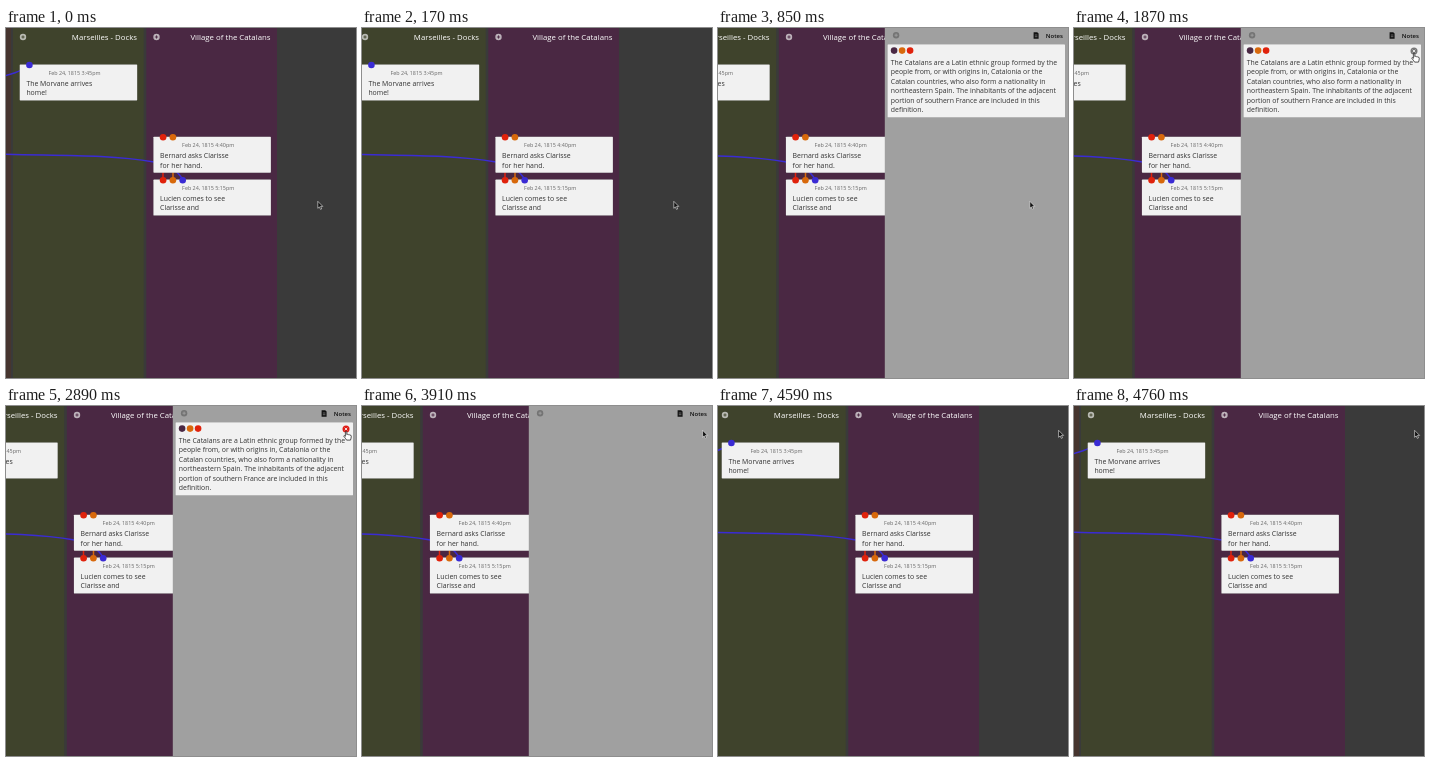
Animation, 350 px wide and 350 px high, one loop 5060 ms. Source, as an HTML page:

```html
<!DOCTYPE html>
<html lang="en">
<head>
<meta charset="utf-8">
<title>Story board</title>
<style>
  html, body { margin: 0; width: 100%; height: 100%; overflow: hidden; background: #3a3a3a; }
  svg { display: block; width: 350px; height: 350px; font-family: "Open Sans", sans-serif; }
  .head { font-size: 7.8px; fill: #fff; text-anchor: end; }
  .body { font-size: 6.9px; fill: #333; }
  .date { font-size: 5.4px; fill: #666; }
  .label { font-size: 6px; font-weight: 600; fill: #111; }
  .card { fill: #f1f1f1; filter: drop-shadow(0 .7px .7px rgba(0, 0, 0, .5)); }
  .thread { fill: none; stroke-width: 1.5; }
</style>
</head>
<body>
<svg viewBox="0 0 350 350">
  <rect width="350" height="350" fill="#3a3a3a"/>
  <g id="board"></g>
  <g id="panel">
    <rect width="190" height="350" fill="#a0a0a0"/>
    <g id="tools"></g>
    <g id="note"></g>
    <g id="close" transform="translate(173.2 23)">
      <circle id="disc" r="3.5"/>
      <path d="M-1.3-1.3 1.3 1.3M1.3-1.3-1.3 1.3" stroke="#f1f1f1" stroke-width=".9"/>
    </g>
  </g>
  <path id="arrow" d="M0 0V7L1.6 5.6 2.7 8.1 3.9 7.6 2.8 5.1H5Z" fill="#111" stroke="#eee" stroke-width=".6"/>
  <path id="hand" d="M-.9.5C-.9-.5.5-.5.5.5V3.2C1.3 2.6 2 2.9 2.2 3.4 3 3 3.5 3.4 3.7 3.9 4.6 3.6 5 4.1 5 4.8 5 6.5 4.6 7 4.2 8.7H.3C-.3 7.3-1.6 6.2-2.4 5-2.8 4.1-1.7 3.9-.9 4.9Z" fill="#fff" stroke="#111" stroke-width=".7"/>
</svg>
<script>
const $ = id => document.getElementById(id);
const RED = "#e0220c", ORANGE = "#d8690c", BLUE = "#3a2bd4", PLUM = "#4a2843";

const text = (cls, x, y, s) => `<text class="${cls}" x="${x}" y="${y}">${s}</text>`;
const lines = (x, y, step, rows) => rows.map((s, i) => text("body", x, y + i * step, s)).join("");
const dot = (x, y, fill, r = 3.3) => `<circle cx="${x}" cy="${y}" r="${r}" fill="${fill}"/>`;
const box = (x, y, w, h) => `<rect class="card" x="${x}" y="${y}" width="${w}" height="${h}" rx=".6"/>`;
const thread = (d, color) => `<path class="thread" d="${d}" stroke="${color}"/>`;
const column = (x, w, fill) => `<rect x="${x}" width="${w}" height="350" fill="${fill}"/>`;
const plus = (x, y, fill, ink) => dot(x, y, fill, 3.2) +
  `<path d="M${x - 1.6} ${y}h3.2M${x} ${y - 1.6}v3.2" stroke="${ink}" stroke-width=".9"/>`;

function card(x, y, date, rows, colors) {
  return box(x, y, 117.5, 36) +
    text("date", x + 28.7, y + 10.4, date) +
    lines(x + 6.7, y + 21.2, 9.6, rows) +
    colors.map((c, i) => dot(x + 9.7 + i * 9.8, y + .6, c)).join("");
}

$("board").innerHTML =
  column(-126, 131, "#46352f") +
  column(7, 130.7, "#3f432c") +
  column(140.3, 130.7, PLUM) +
  plus(17, 9, "#b9bab3", "#3f432c") + text("head", 131, 12, "Marseilles - Docks") +
  plus(150.5, 9, "#bdb2ba", PLUM) + text("head", 264.5, 12, "Village of the Catalans") +
  thread("M-10 50C0 47.5 14 45 23.5 36.5", BLUE) +
  thread("M-10 126C50 128 100 126 148 134 162 136.5 172 143 177 152", BLUE) +
  thread("M157 109V152", RED) +
  thread("M167 109V152", ORANGE) +
  card(13.7, 36.4, "Feb 24, 1815 3:45pm", ["The Morvane arrives", "home!"], [BLUE]) +
  card(147.4, 108.7, "Feb 24, 1815 4:40pm", ["Bernard asks Clarisse", "for her hand."], [RED, ORANGE]) +
  card(147.4, 151.6, "Feb 24, 1815 5:15pm", ["Lucien comes to see", "Clarisse and"], [RED, ORANGE, BLUE]);

$("tools").innerHTML =
  plus(11.3, 7.2, "#747474", "#a0a0a0") +
  `<path d="M148.8 4.2h3.6l1.4 1.4v5.2h-5z" fill="#111"/>` +
  `<path d="M150 7h2.6M150 8.7h2.6" stroke="#a0a0a0" stroke-width=".6"/>` +
  text("label", 161, 10.2, "Notes");

$("note").innerHTML = box(2.6, 16.2, 177.6, 73.3) +
  dot(9.3, 22.6, PLUM) + dot(17.3, 22.6, ORANGE) + dot(25.3, 22.6, RED) +
  lines(6, 36.7, 9.55, [
    "The Catalans are a Latin ethnic group formed by the",
    "people from, or with origins in, Catalonia or the",
    "Catalan countries, who also form a nationality in",
    "northeastern Spain. The inhabitants of the adjacent",
    "portion of southern France are included in this",
    "definition."
  ]);

const LOOP = 5060;
const HIDDEN = 360;
// [time, board x, panel x]
const slides = [
  [0, 0, HIDDEN], [170, -14, HIDDEN], [340, -70.5, 209.6], [510, -79.5, 166.8],
  [4420, -61, 228.8], [4590, -10, HIDDEN], [4760, 0, HIDDEN]
];
// [time, shape, x, y]
const moves = [
  [0, "arrow", 311.8, 173.3], [1020, "arrow", 318, 107.3], [1190, "arrow", 328, 42],
  [1360, "arrow", 335, 31], [1530, "arrow", 336.3, 27], [1700, "hand", 340, 27.6],
  [1870, "hand", 340.3, 25.4], [3060, "arrow", 340.6, 24.3]
];
// [time, note shown, close button colour]
const notes = [
  [0, true, ""], [1190, true, "#777"], [2040, true, "#e01c16"], [3060, false, ""]
];

const at = (table, t) => table.findLast(row => row[0] <= t);
const place = (id, x, y) => $(id).setAttribute("transform", `translate(${x} ${y})`);
const show = (id, on) => $(id).setAttribute("visibility", on ? "visible" : "hidden");

function draw() {
  const t = performance.now() % LOOP;
  const [, boardX, panelX] = at(slides, t);
  const [, shape, x, y] = at(moves, t);
  const [, noted, color] = at(notes, t);
  place("board", boardX, 0);
  place("panel", panelX, 0);
  place(shape, x, y);
  show("arrow", shape === "arrow");
  show("hand", shape === "hand");
  show("note", noted);
  show("close", color);
  $("disc").setAttribute("fill", color || "none");
  requestAnimationFrame(draw);
}
draw();
</script>
</body>
</html>
```
